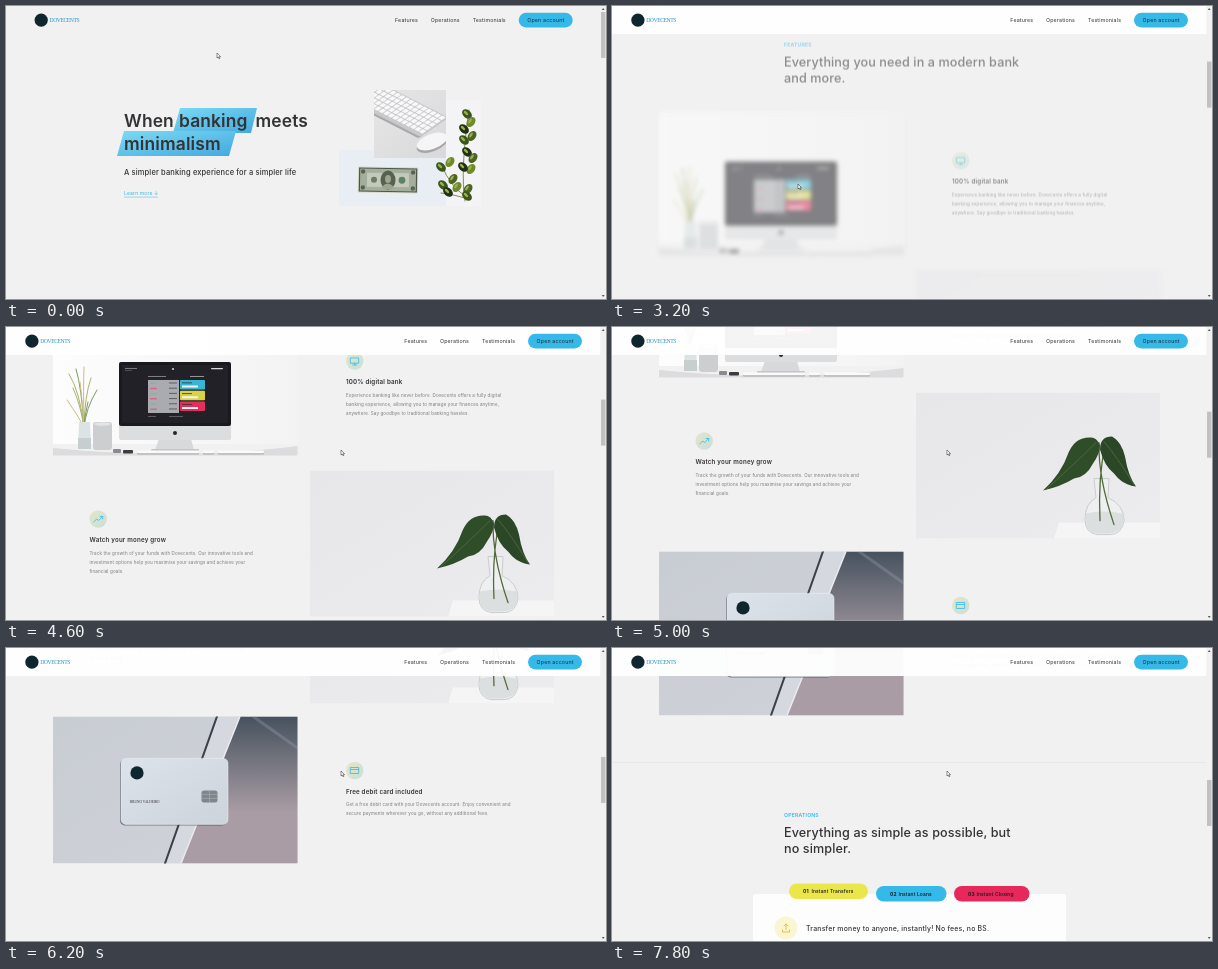
These frames come from a looping animation (600 by 293 pixels, 8000 ms). An HTML page:

```html
<!DOCTYPE html>
<html lang="en">
<head>
<meta charset="utf-8">
<title>Bank landing page</title>
<style>
  html, body { margin: 0; width: 100%; height: 100%; overflow: hidden; background: #f1f1f2; }
  svg { display: block; width: 100%; height: 100%; }
  text { font-family: Inter, sans-serif; letter-spacing: .03em; fill: #333335; white-space: pre; }
  .brand { font: 5.7px "Liberation Serif", serif; letter-spacing: -.08em; fill: #2797bd; }
  .nav { font-size: 5.3px; }
  .h1 { font-size: 17.4px; font-weight: 600; letter-spacing: .008em; }
  .h2 { font-size: 12.6px; font-weight: 500; letter-spacing: .008em; }
  .lead { font-size: 7.5px; font-weight: 500; letter-spacing: .018em; }
  .link { font-size: 5px; fill: #2fb3e3; }
  .label { font-size: 5.2px; font-weight: 600; fill: #35b9e9; }
  .title { font-size: 6.2px; font-weight: 600; }
  .copy { font-size: 4.5px; fill: #7b7b7d; }
  .tab { font-size: 4.9px; font-weight: 500; fill: #151517; }
  .slogan { font-size: 6.9px; font-weight: 500; }
</style>
</head>
<body>
<svg id="stage" viewBox="0 0 600 293" preserveAspectRatio="none"></svg>
<script>
const BLUE = '#35b9e9', DARK = '#10262f';
const LOOP = 8000, STEP = 200;
const FEATURES_TOP = 293, OPERATIONS_TOP = 924;

const text = (cls, x, y, s, extra = '') => `<text class="${cls}" x="${x}" y="${y}" ${extra}>${s}</text>`;
const rect = (x, y, w, h, fill, r = 0, extra = '') =>
  `<rect x="${x}" y="${y}" width="${w}" height="${h}" rx="${r}" fill="${fill}" ${extra}/>`;
const circle = (x, y, r, fill) => `<circle cx="${x}" cy="${y}" r="${r}" fill="${fill}"/>`;
const oval = (x, y, rx, ry, angle, fill) =>
  `<ellipse rx="${rx}" ry="${ry}" fill="${fill}" transform="translate(${x} ${y}) rotate(${angle})"/>`;
const shape = (d, fill, extra = '') => `<path d="${d}" fill="${fill}" ${extra}/>`;
const line = (d, stroke, width = 1) =>
  `<path d="${d}" fill="none" stroke="${stroke}" stroke-width="${width}" stroke-linecap="round" stroke-linejoin="round"/>`;
const group = (id, body) => `<g id="${id}">${body}</g>`;
const gradient = (id, from, to, x2 = 1, y2 = 1) =>
  `<linearGradient id="${id}" x2="${x2}" y2="${y2}"><stop stop-color="${from}"/><stop offset="1" stop-color="${to}"/></linearGradient>`;
const repeat = (n, make) => Array.from({ length: n }, (_, i) => make(i)).join('');
const photo = (x, y, w, h, body) =>
  `<svg x="${x}" y="${y}" width="${w}" height="${h}" overflow="hidden">${body}</svg>`;

const defs = `<defs>
  ${gradient('highlight', '#7cdaf4', '#43a9de')}
  ${gradient('desk', '#e6e6e7', '#d9d9db')}
  ${gradient('wall', '#fdfdfd', '#f3f3f4', 1, 0)}
  ${gradient('studio', '#e7e7ea', '#ececee')}
  ${gradient('marble', '#c8cdd3', '#d0d3d9')}
  ${gradient('fabric', '#46525e', '#a99ca4', 0, .65)}
  ${gradient('card', '#dde3ea', '#ccd3db')}
  ${gradient('badge', '#e4e6c8', '#c9dfd8')}
</defs>`;

/* Hero */
function keyboardPhoto() {
  const keys = repeat(75, i => rect(-70 + (i % 15) * 5, -27 + Math.floor(i / 15) * 5.2, 4.1, 4.3, '#f8f8f9', .7));
  return photo(368, 84, 72, 68, rect(0, 0, 72, 68, 'url(#desk)') +
    `<g transform="translate(43 43) rotate(27) skewX(-28)">${rect(-80, -27, 86, 31, '#a9a9ad', 2)}
      ${rect(-80, -28, 86, 30, '#c9c9cc', 2)}${keys}</g>` +
    oval(58, 54, 16, 7.5, -20, '#a6a6aa') + oval(58, 51.5, 16, 7.5, -20, '#f5f5f6'));
}

function banknote() {
  return rect(333, 144, 107, 56, '#e8eef4') +
    `<g transform="rotate(1 382 174)">` +
    rect(352, 161, 60, 26, '#d5dacb') + rect(353.5, 162.5, 57, 23, '#a4ae9c', 0, 'stroke="#4c5847" stroke-width="1.2"') +
    rect(361, 167, 42, 14, '#c3cab9') + oval(382, 174, 7.5, 9.5, 0, '#56614f') + oval(382, 173, 3, 4, 0, '#9ba590') +
    shape('M376 181Q382 174 388 181L386 183H378Z', '#9ba590') +
    circle(368, 174, 3, '#6d7966') + circle(396, 174, 3.4, '#5f8068') +
    [357, 407].map(x => circle(x, 166, 2.2, '#576350') + circle(x, 182, 2.2, '#576350')).join('') + '</g>';
}

function branch() {
  const greens = ['#3b561d', '#6f8a2c', '#1f3016', '#4c6524'];
  const leaves = [[461, 108], [465, 116], [458, 123], [466, 130], [458, 134], [444, 156], [461, 146], [467, 152],
    [435, 161], [465, 163], [457, 161], [447, 173], [437, 179], [451, 181], [442, 186], [462, 183], [461, 190]];
  return rect(440, 94, 35, 106, '#f4f4f6') + line('M459 195Q454 165 463 104M459 190Q444 180 436 160M459 192Q446 188 435 187', '#6b6c35', .8) +
    leaves.map(([x, y], i) => oval(x, y, 5.6, 3.9, i % 2 ? -55 : 42, greens[i % 4]) +
      oval(x - 1, y - 1, 2.8, 1.2, i % 2 ? -55 : 42, '#9db04a')).join('');
}

const hero =
  shape('M174 102H251L245 127H167Z', 'url(#highlight)') + shape('M118 125H230L223 150H111Z', 'url(#highlight)') +
  text('h1', 118, 120.5, 'When') + text('h1', 173, 120.5, 'banking') + text('h1', 249.5, 120.5, 'meets') +
  text('h1', 118, 143.7, 'minimalism') +
  text('lead', 118, 168.5, 'A simpler banking experience for a simpler life') +
  text('link', 118, 188.5, 'Learn more ↓') + rect(118, 190.8, 34, .5, BLUE) +
  banknote() + branch() + keyboardPhoto();

/* Features: photos use their own top-left corner as origin */
function computerPhoto() {
  const blades = [[16, 62], [23, 57], [31, 55], [38, 66], [44, 78], [14, 88], [20, 76], [35, 90], [27, 70]];
  return rect(0, 0, 245, 146, 'url(#wall)') + rect(0, 132, 245, 14, '#f1f1f2') +
    shape('M0 136Q60 142 120 142T245 134V146H0Z', '#dcdcde') +
    blades.map(([x, y], i) => line(`M31 116Q${30 + (x - 30) * .2} ${y + 18} ${x} ${y}`, ['#a9b26c', '#7f9a63', '#cdbf79'][i % 3], 1)).join('') +
    shape('M26 110H37L38 137H25Z', '#dde3e4') + shape('M25 126H38L38 137H25Z', '#c6cfcd') +
    rect(40, 110, 19, 28, '#cdced0', 3) + oval(49.5, 112, 8, 1.8, 0, '#e4e4e6') +
    rect(60, 137, 8, 4, '#8b8b8f', 1) + rect(70, 138, 10, 3.5, '#3d3d41', 1) +
    shape('M106 127H138L141 138H102Z', '#d8d9db') + rect(98, 137, 48, 2, '#c4c4c7', 1) +
    rect(66, 50, 112, 78, '#dcdddf', 2) + rect(66, 50, 112, 64, '#1a1a1e', 2) +
    rect(69, 53, 106, 58, '#222127') + circle(122, 121, 2, '#26262a') +
    rect(72, 56, 12, .7, '#a4a4a8') + rect(72, 58.5, 7, .5, '#77777b') + circle(120, 57, 1, '#d9d9db') + rect(158, 56, 12, 1.2, '#d9d9db', .6) +
    rect(95, 64, 18, .8, '#99999d') + rect(137, 64, 14, .8, '#b5b5b8') +
    rect(95, 68, 31, 33, '#a9abb0') + repeat(6, i => rect(97, 70.5 + i * 5.2, 7, 1.5, i % 2 ? '#d76686' : '#86b59b', .7) + rect(116, 70.5 + i * 5.2, 8, 1, '#5d5e62')) +
    ['#36b6d2', '#d9d344', '#e42e5f'].map((c, i) => rect(127, 68 + i * 10.8, 25, 9.5, c, 1) +
      rect(129, 70.5 + i * 10.8, 10, .8, '#333') + rect(129, 73.5 + i * 10.8, 16, 2, '#f2f2f2', .5)).join('') +
    rect(95, 104, 8, .7, '#77777b') + rect(116, 104, 14, .7, '#77777b') +
    [[84, 62], [150, 11], [165, 46]].map(([x, w]) => rect(x, 140, w, 2.6, '#aeaeb2', 1) + rect(x, 138.6, w, 2.6, '#fafafb', 1)).join('');
}

function leafPhoto() {
  return rect(0, 0, 244, 146, 'url(#studio)') + shape('M143 130H244V146H138Z', '#f5f5f6') +
    shape('M178 86H193L192 105Q208 112 208 128Q206 142 194 142H181Q169 140 169 127Q169 111 180 105Z', '#eeeff0', 'stroke="#b9bebf" stroke-width=".7"') +
    shape('M170 121Q188 117 207 121Q210 140 193 141H182Q167 139 170 121Z', '#dcdfe0') +
    line('M183 50Q182 85 198 132M189 53Q182 85 184 128', '#536b3c', 1.3) +
    shape('M175 45Q160 44 153 59Q145 82 127 98Q145 94 158 86Q170 85 177 71Q184 61 184 53Q181 45 175 45Z', '#304d2a') +
    shape('M184 57Q184 44 196 44Q206 50 209 64Q212 83 220 94Q206 92 198 81Q188 73 184 57Z', '#2b4727') +
    line('M180 50Q160 70 131 96M188 49Q201 64 218 92', '#587347', .7);
}

function cardPhoto() {
  return rect(0, 0, 244.5, 147, 'url(#marble)') + shape('M187 0H245V147H128Z', 'url(#fabric)') +
    line('M200 0L245 32', 'rgba(160,170,182,.3)', 3) +
    shape('M164 0H187L128 147H112Z', '#d5d8de') +
    line('M164 0L112 147', '#3b4149', 2) + line('M187 0L128 147', '#ececf0', 1.4) +
    rect(67, 43, 107, 66, 'rgba(50,58,68,.6)', 5) + rect(68, 42, 107, 66, 'url(#card)', 5, 'stroke="#eef1f5" stroke-width=".5"') +
    circle(84, 56.5, 6.6, DARK) +
    rect(148.5, 74, 16, 12, '#81868c', 2.5) + line('M149 78H164M149 82H164M156.5 75V86', '#b2b6ba', .5) +
    text('', 77, 86.5, 'BRUNO VALDEIRO', 'style="font:3.4px Liberation Serif,serif;letter-spacing:0"');
}

const icons = [
  line('M-4 -3H4V2.2H-4ZM-2 4H2M0 2.2V4', BLUE, .8),
  line('M-4.5 3L-1.5 0L.5 1.5L4.5 -2.5M2 -2.5H4.5V0', BLUE, .8),
  line('M-4 -3H4V3H-4ZM-4 -1H4', BLUE, .8),
];
function feature(x, y, icon, title, copy) {
  return `<g transform="translate(${x} ${y})">${circle(8.7, 0, 8.7, 'url(#badge)')}
    <g transform="translate(8.7 0)">${icon}</g>${text('title', 0, 23, title)}
    ${copy.map((s, i) => text('copy', 0, 35.8 + i * 9, s)).join('')}</g>`;
}
const heading = (label, first, second) =>
  text('label', 172, 55, label) + text('h2', 172, 75, first) + text('h2', 172, 91.3, second);

const features = heading('FEATURES', 'Everything you need in a modern bank', 'and more.') +
  group('photos', photo(47, 120, 244.5, 143.5, computerPhoto()) + photo(304, 278.6, 244, 146, leafPhoto()) + photo(47, 437.4, 244.5, 147, cardPhoto())) +
  feature(340, 169, icons[0], '100% digital bank', [
    'Experience banking like never before. Dovecents offers a fully digital',
    'banking experience, allowing you to manage your finances anytime,',
    'anywhere. Say goodbye to traditional banking hassles.']) +
  feature(83.5, 327, icons[1], 'Watch your money grow', [
    'Track the growth of your funds with Dovecents. Our innovative tools and',
    'investment options help you maximise your savings and achieve your',
    'financial goals.']) +
  feature(340, 491.5, icons[2], 'Free debit card included', [
    'Get a free debit card with your Dovecents account. Enjoy convenient and',
    'secure payments wherever you go, without any additional fees.']);

/* Operations */
const tab = (x, y, w, fill, number, label) => rect(x, y, w, 15.6, fill, 7.8) +
  text('tab', x + 14, y + 9.5, number, 'style="font-weight:700"') + text('tab', x + 22.5, y + 9.5, label);
const operations = rect(0, 0, 594, .6, '#e3e3e6') +
  heading('OPERATIONS', 'Everything as simple as possible, but', 'no simpler.') +
  rect(141, 132, 313, 120, '#fdfdfd', 3) +
  tab(177, 121.5, 79, '#ebe74b', '01', 'Instant Transfers') +
  tab(264, 124, 70.5, BLUE, '02', 'Instant Loans') +
  tab(342, 124, 75.5, '#e7285b', '03', 'Instant Closing') +
  circle(174, 166, 11.5, '#faf5d2') + line('M170.5 168V170H177.5V168M174 167.5V162M172 164L174 162L176 164', '#e0bd38', .9) +
  text('slogan', 194, 168.8, 'Transfer money to anyone, instantly! No fees, no BS.');

/* Fixed parts */
const nav = rect(0, 0, 594.5, 28, '#fff', 0, 'id="navBack" fill-opacity=".95"') +
  group('navLeft', circle(35.2, 14.2, 6.6, DARK) + text('brand', 43.5, 16.2, 'DOVECENTS')) +
  group('navRight', text('nav', 389, 16, 'Features') + text('nav', 424.7, 16, 'Operations') + text('nav', 466.7, 16, 'Testimonials') +
    rect(512.7, 6.8, 54, 14.6, BLUE, 7.3) + text('nav', 539.8, 16, 'Open account', 'text-anchor="middle" style="fill:#1b2a33"'));
const scrollbar = rect(594.5, 0, 5.5, 293, '#f1f1f1') + rect(595, 6, 4.5, 46, '#c1c1c1', 0, 'id="thumb"') +
  shape('M595.8 4L597.2 2L598.6 4Z', '#555') + shape('M595.8 289L597.2 291L598.6 289Z', '#555');
const cursor = shape('M0 0V5L1.2 4L2 5.8L2.8 5.4L2 3.7H3.6Z', '#fff', 'id="arrow" stroke="#222" stroke-width=".5"') +
  `<g id="beam">${line('M-.7 -2H.7M0 -2V2M-.7 2H.7', '#444', .5)}</g>`;

document.getElementById('stage').innerHTML = defs + rect(0, 0, 600, 293, '#f1f1f2') +
  group('hero', hero) + group('features', features) + group('operations', operations) +
  group('nav', nav) + scrollbar + group('cursor', cursor);
const el = id => document.getElementById(id);
const move = (id, x, y) => el(id).setAttribute('transform', `translate(${x} ${y})`);

/* Motion: keys are [time, ...values] */
const scrollKeys = [[2400, 0], [3100, 319], [4100, 319], [5000, 506], [5100, 506], [6000, 662], [6500, 662], [7800, 810]];
const cursorKeys = [[0, 211, 47], [1200, 236, 112], [1600, 176, 163], [2000, 141, 185], [2500, 141, 185],
  [3200, 186, 178], [3900, 333, 123], [4300, 335, 123]];

const clamp = x => Math.min(1, Math.max(0, x));
function sample(keys, t) {
  const last = keys[keys.length - 1];
  if (t >= last[0]) return last.slice(1);
  const i = Math.max(1, keys.findIndex(k => k[0] >= t));
  const [a, b] = [keys[i - 1], keys[i]];
  const p = clamp((t - a[0]) / (b[0] - a[0])), e = p * p * (3 - 2 * p);
  return a.slice(1).map((v, j) => v + (b[j + 1] - v) * e);
}
function reveal(id, top, t, start) {
  const rest = (1 - clamp((t - start) / 1000)) ** 2;
  move(id, 0, top + 25 * rest);
  el(id).setAttribute('opacity', 1 - rest);
}

function draw(t) {
  const [scroll] = sample(scrollKeys, t), [x, y] = sample(cursorKeys, t);
  const stuck = scroll > 265, overText = scroll === 0 && y > 158 && y < 171;
  move('hero', 0, -scroll);
  reveal('features', FEATURES_TOP - scroll, t, 2880);
  reveal('operations', OPERATIONS_TOP - scroll, t, 6800);
  el('photos').style.filter = t < 3400 ? 'blur(2px)' : 'none';
  move('nav', 0, stuck ? 0 : -scroll);
  move('navLeft', stuck ? -9.3 : 0, 0);
  move('navRight', stuck ? 9.3 : 0, 0);
  el('navBack').setAttribute('visibility', stuck ? 'visible' : 'hidden');
  el('thumb').setAttribute('y', 6 + scroll * .1555);
  move('cursor', x, y);
  el('arrow').setAttribute('visibility', overText ? 'hidden' : 'visible');
  el('beam').setAttribute('visibility', overText ? 'visible' : 'hidden');
}

const begin = performance.now();
function tick() {
  const t = (performance.now() - begin) % LOOP;
  draw(Math.floor(t / STEP) * STEP);
  requestAnimationFrame(tick);
}
tick();
</script>
</body>
</html>
```
